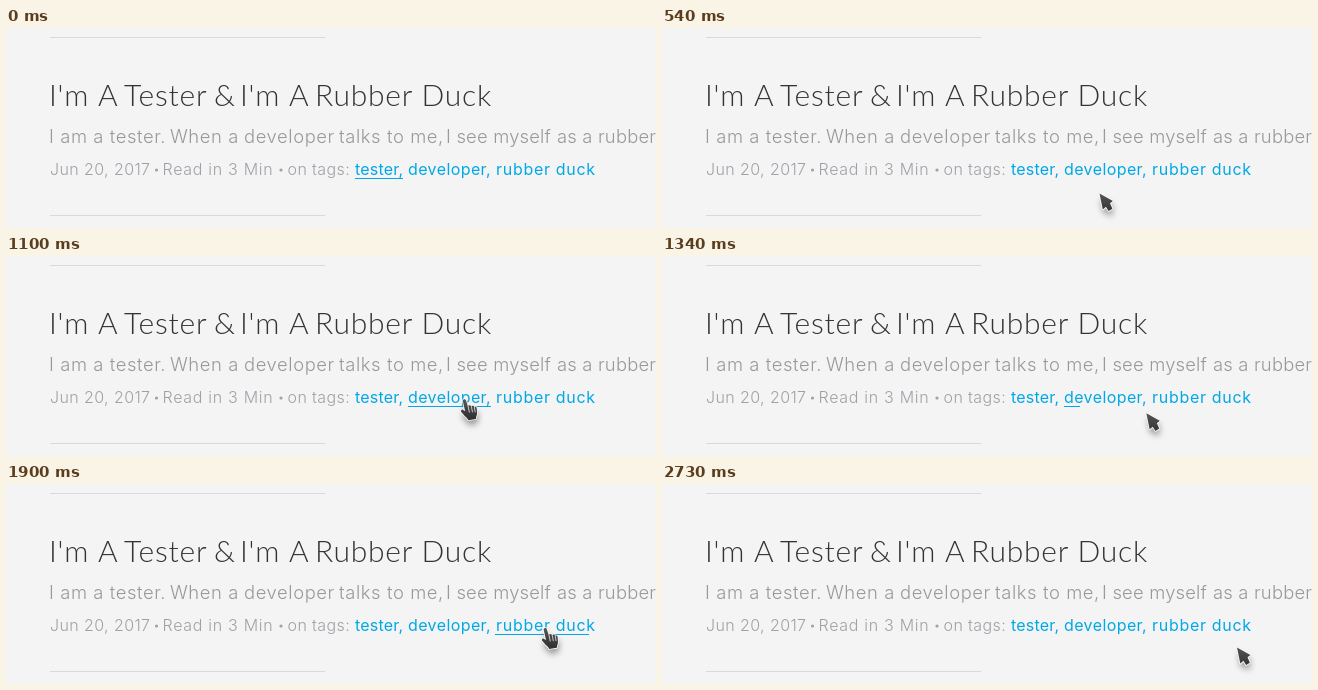
Write an HTML page with a canvas that moves like this. It is 650 px wide and 200 px high and loops after 2.78 s.

```html
<!DOCTYPE html>
<html lang="en">
<head>
<meta charset="utf-8">
<title>Tag links</title>
<style>
  html, body { margin: 0; width: 100%; height: 100%; overflow: hidden; background: #f4f4f4; }
  svg, canvas { position: absolute; left: 0; top: 0; width: 650px; height: 200px; }
  .title { font: 300 30px Lato, "Open Sans", sans-serif; fill: #333; letter-spacing: .8px; }
  .lead { font: 300 18.4px Inter, "Open Sans", sans-serif; fill: #999; letter-spacing: .6px; }
  .meta { font: 300 16px Inter, "Open Sans", sans-serif; fill: #a0a0a8; letter-spacing: .4px; }
  .link { font-weight: 400; fill: #00a8e6; }
  .tight { letter-spacing: .2px; }
  .loose { letter-spacing: .7px; }
  .rule { fill: #d9d9d9; }
</style>
</head>
<body>
<svg viewBox="0 0 650 200">
  <rect class="rule" x="44" y="9" width="275" height="1"/>
  <rect class="rule" x="44" y="187" width="275" height="1"/>
  <text class="title" y="78">
    <tspan x="43">I'm</tspan> <tspan x="92">A</tspan> <tspan x="118">Tester</tspan>
    <tspan x="208">&amp;</tspan> <tspan x="234">I'm</tspan> <tspan x="283">A</tspan>
    <tspan x="309">Rubber</tspan> <tspan x="415.5">Duck</tspan>
  </text>
  <text class="lead" y="115">
    <tspan x="43">I am a tester.</tspan> <tspan x="164">When a</tspan>
    <tspan x="238">developer</tspan> <tspan x="333">talks to me,</tspan>
    <tspan x="440" class="tight">I see myself</tspan> <tspan x="551" class="tight">as a rubber</tspan>
  </text>
  <text class="meta" y="147">
    <tspan x="44">Jun 20, 2017</tspan> <tspan x="156.5" class="loose">Read in 3 Min</tspan>
    <tspan x="281.5">on tags:</tspan>
    <tspan x="349" class="link tight">tester,</tspan>
    <tspan x="402" class="link">developer,</tspan>
    <tspan x="490" class="link loose">rubber duck</tspan>
  </text>
  <circle cx="150.5" cy="142" r="1.6" fill="#a0a0a8"/>
  <circle cx="275" cy="142" r="1.6" fill="#a0a0a8"/>
</svg>
<canvas id="stage"></canvas>
<script>
const LOOP = 2780, STEP = 40, FADE = 300;
const canvas = document.getElementById('stage');
const ctx = canvas.getContext('2d');
const dpr = window.devicePixelRatio || 1;
canvas.width = 650 * dpr;
canvas.height = 200 * dpr;

// Left edge, width, hover start, hover end
const links = [
  { x: 349, w: 48, on: -FADE, off: 130 },
  { x: 402, w: 83, on: 675, off: 1190 },
  { x: 489, w: 100, on: 1690, off: 2040 }
];

// Pointer hot spot: time, x, y
const path = [
  [140, 383, 152], [280, 402, 166], [400, 421, 169], [540, 437.5, 165],
  [660, 447, 160], [780, 454, 150], [940, 458.5, 143.5], [1090, 458.5, 143.5],
  [1220, 470, 151], [1380, 489, 158], [1540, 505, 157], [1620, 506.5, 155],
  [1740, 519, 148], [1900, 539.5, 144.5], [1980, 549, 145], [2080, 558, 151],
  [2160, 566, 157], [2240, 572.5, 161.5], [2320, 575, 163], [LOOP, 575, 163]
];

const arrow = new Path2D('M0 .5L13.8 8.2L10.8 10.6L13.3 16.2L9.4 18.6L6.6 14.2L3.4 17Z');
const hand = new Path2D(
  'M-2 1.8C-2.4-.8 .8-1.4 1.6 1L3.6 7.4C4.8 5.9 6.8 6 7.4 7.6' +
  'C8.8 6.4 10.6 6.8 11 8.4C12.4 7.6 13.6 8.4 13.8 10L14.2 15' +
  'C14.2 17.4 13.2 18.6 12.8 22L4.2 23.4C3.4 20.6-.6 18.4-3.8 14' +
  'C-4.8 12.2-3.2 10.6-1.6 11.8L.6 13.2Z');
const knuckles = new Path2D('M4 7.6L5.4 14.2M7.7 8L8.9 14M11.1 8.8L12 14');

const clamp = v => Math.min(1, Math.max(0, v));

// CSS "ease": cubic-bezier(.25, .1, .25, 1)
function ease(p) {
  if (p <= 0 || p >= 1) return clamp(p);
  let lo = 0, hi = 1, s = p;
  for (let i = 0; i < 20; i++) {
    s = (lo + hi) / 2;
    const x = .75 * s * (1 - s) + s ** 3;
    if (x < p) lo = s; else hi = s;
  }
  return .3 * s * (1 - s) ** 2 + 3 * s * s * (1 - s) + s ** 3;
}

function slope(i, k) {
  const a = path[i - 1], b = path[i], c = path[i + 1];
  if (!a || !c || a[k] === b[k] || b[k] === c[k]) return 0;
  return (c[k] - a[k]) / (c[0] - a[0]);
}

function pointAt(t) {
  let i = 0;
  while (i < path.length - 2 && t >= path[i + 1][0]) i++;
  const a = path[i], b = path[i + 1], d = b[0] - a[0];
  const u = clamp((t - a[0]) / d), v = 1 - u;
  return [1, 2].map(k =>
    a[k] * v * v * (1 + 2 * u) + b[k] * u * u * (3 - 2 * u) +
    d * u * v * (v * slope(i, k) - u * slope(i + 1, k)));
}

function drawCursor(x, y, isHand) {
  const shape = isHand ? hand : arrow;
  const size = isHand ? .88 : .97;
  ctx.save();
  ctx.translate(x, y);
  ctx.scale(size, size);
  ctx.lineJoin = ctx.lineCap = 'round';
  ctx.shadowColor = 'rgba(0,0,0,.4)';
  ctx.shadowBlur = 6 * dpr;
  ctx.shadowOffsetX = dpr;
  ctx.shadowOffsetY = 5 * dpr;
  ctx.fillStyle = '#444';
  ctx.fill(shape);
  ctx.shadowColor = 'transparent';
  ctx.strokeStyle = '#f7f7f7';
  ctx.lineWidth = 1.8;
  ctx.stroke(shape);
  const shade = ctx.createLinearGradient(0, 0, 0, 20);
  shade.addColorStop(0, '#555');
  shade.addColorStop(1, '#333');
  ctx.fillStyle = shade;
  ctx.fill(shape);
  if (isHand) {
    ctx.strokeStyle = '#ddd';
    ctx.lineWidth = 1;
    ctx.stroke(knuckles);
  }
  ctx.restore();
}

function draw(t) {
  ctx.setTransform(dpr, 0, 0, dpr, 0, 0);
  ctx.clearRect(0, 0, 650, 200);
  ctx.fillStyle = '#00a8e6';
  for (const { x, w, on, off } of links) {
    const grown = ease((t - on) / FADE) - ease((t - off) / FADE);
    ctx.fillRect(x, 150, Math.round(w * grown), 1);
  }
  if (t < path[0][0]) return;
  const [x, y] = pointAt(t);
  drawCursor(x, y, links.some(l => t >= l.on && t < l.off));
}

const start = performance.now();
function tick() {
  const t = (performance.now() - start) % LOOP;
  draw(Math.max(0, Math.floor((t - 20) / STEP) * STEP + 20));
  requestAnimationFrame(tick);
}
tick();
</script>
</body>
</html>
```
